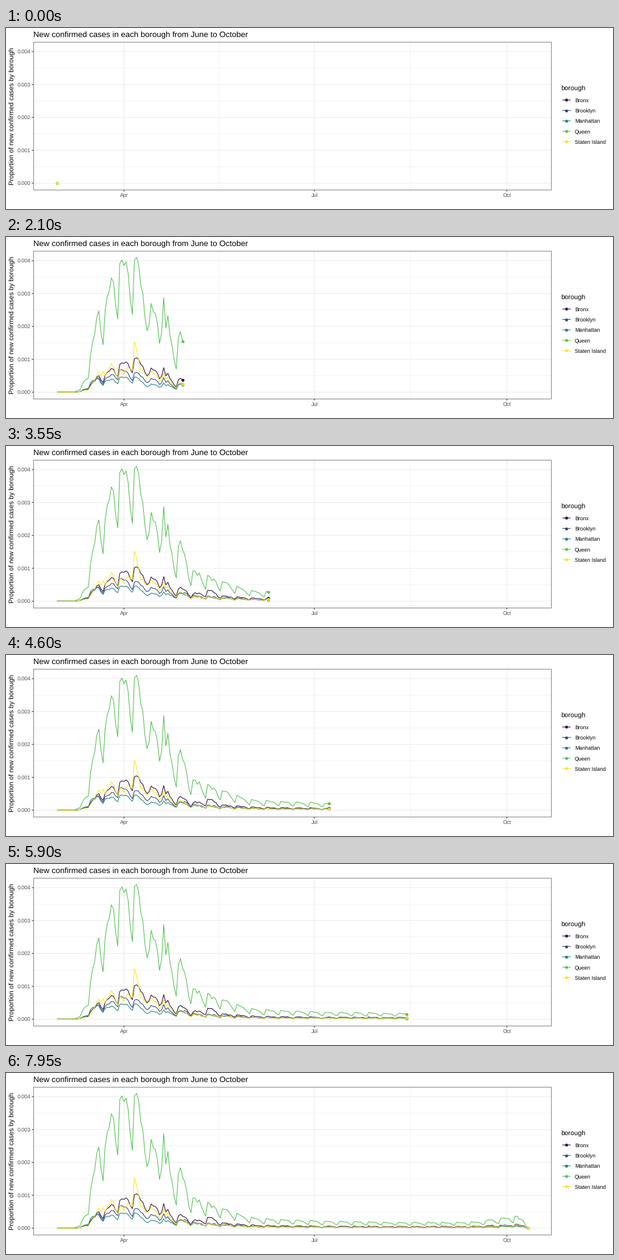
A matplotlib script that plays this animation: 1000 by 300 pixels, repeating every 8 s.

```python
import numpy as np
import matplotlib.pyplot as plt
from matplotlib.animation import FuncAnimation

plt.rcParams["font.family"] = "Liberation Sans"
plt.rcParams["text.hinting"] = "none"

W, H, DPI = 1000, 300, 100
FRAMES, INTERVAL = 160, 50
LAST_DAY = 225                      # 29 Feb to 11 Oct
LEFT, RIGHT, TOP, BOTTOM = 45.3, 898.3, 23.4, 268.3
X0, DAY = LEFT + (RIGHT - LEFT) / 22, (RIGHT - LEFT) / 1.1 / LAST_DAY
Y0, UNIT = 257.2, 0.545             # pixels per 0.00001
GRID, DARK, GREY = "#EBEBEB", "#333333", "#4D4D4D"

rng = np.random.default_rng(7)
days = np.arange(LAST_DAY + 1)


def px(pts):
    return pts * 72 / DPI


def day_x(d):
    return X0 + DAY * d


def curve(*knots):
    return np.interp(days, *zip(*knots))


def jitter(amount):
    """Random scatter once the first wave is over."""
    return 1 + amount * rng.uniform(-1, 1, len(days)) * (days > 60)


# one epidemic level, modulated by the weekly reporting rhythm
week = np.array([.7, .55, 1.15, 1.15, 1.07, 1.07, .95])[days % 7]
level = curve((8, 0), (11, 7), (13, 36), (16, 98), (18, 165), (20, 260),
              (22, 262), (23, 216), (26, 325), (29, 405), (30, 340),
              (34, 380), (36, 430), (37, 350), (39, 363), (40, 304),
              (43, 340), (44, 180), (45, 235), (49, 212), (50, 330),
              (52, 170), (53, 218), (54, 160), (57, 128), (59, 160),
              (64, 86), (72, 65), (80, 52), (87, 37), (94, 27), (101, 24),
              (130, 18), (167, 15), (200, 16), (212, 26), (219, 31),
              (223, 22), (225, 0))
wave = level * week * jitter(.07)

# each borough follows the wave at its own slowly changing share
GROUPS = [
    ("Bronx", "#31063F",
     wave * jitter(.15) * curve((16, .2), (29, .21), (36, .25), (48, .28),
                                (57, .22), (70, .28), (74, .5), (77, .28),
                                (225, .32))),
    ("Brooklyn", "#2F437B",
     wave * jitter(.15) * curve((16, .2), (25, .15), (30, .175), (37, .145),
                                (48, .16), (59, .135), (62, .19), (225, .24))),
    ("Manhattan", "#1F7F7D",
     wave * jitter(.15) * curve((16, .26), (20, .16), (25, .115), (37, .115),
                                (43, .09), (53, .1), (62, .16), (225, .18))),
    ("Queen", "#52BF52", wave),
    ("Staten Island", "#F9E622",
     wave * jitter(.15) * curve((16, .16), (21, .27), (22, .44), (23, .2),
                                (26, .25), (32, .14), (36, .28), (37, .38),
                                (40, .2), (43, .25), (59, .16), (225, .26))),
]
CURVES = [Y0 - UNIT * values for _, _, values in GROUPS]

fig = plt.figure(figsize=(W / DPI, H / DPI), dpi=DPI, facecolor="white")
ax = fig.add_axes([0, 0, 1, 1])
ax.set(xlim=(0, W), ylim=(H, 0))
ax.axis("off")


def rule(xs, ys, color, width=1.07, z=1):
    return ax.plot(xs, ys, color=color, lw=px(width), zorder=z, snap=False,
                   solid_capstyle="butt", solid_joinstyle="round")[0]


def dot(x, y, color, z):
    return ax.plot([x], [y], "o", color=color, ms=px(4.8), mew=0, zorder=z,
                   snap=False)[0]


def label(x, y, s, size=8.8, color="black", **kw):
    ax.text(x, y, s, fontsize=px(size), color=color, va="baseline", **kw)


# grid, ticks and axis labels
for y in Y0 - UNIT * np.arange(50, 400, 100):
    rule([LEFT, RIGHT], [y, y], GRID, .54)
for x in day_x(np.array([77.5, 169])):
    rule([x, x], [TOP, BOTTOM], GRID, .54)
for i in range(5):
    y = Y0 - UNIT * 100 * i
    rule([LEFT, RIGHT], [y, y], GRID)
    rule([LEFT - 2.75, LEFT], [y, y], DARK)
    label(40.4, y + 3.2, f"{i / 1000:.3f}", color=GREY, ha="right")
for day, month in [(32, "Apr"), (123, "Jul"), (215, "Oct")]:
    x = day_x(day)
    rule([x, x], [TOP, BOTTOM], GRID)
    rule([x, x], [BOTTOM, BOTTOM + 2.75], DARK)
    label(x, 280, month, color=GREY, ha="center")
border = rule([LEFT, RIGHT, RIGHT, LEFT, LEFT],
              [TOP, TOP, BOTTOM, BOTTOM, TOP], DARK, .6, 9)
border.set_snap(True)

label(45.2, 15.2, "New confirmed cases in each borough from June to October", 13.2)
label(13.4, 146.2, "Proportion of new confirmed cases by borough", 11,
      rotation=90, rotation_mode="anchor", ha="center")
label(914.4, 104.2, "borough", 11)

lines, dots = [], []
for i, (name, color, _) in enumerate(GROUPS):
    y = 119.3 + 17.28 * i
    rule([916.5, 930.3], [y, y], color)
    dot(923.4, y, color, 2)
    label(937, y + 3.2, name)
    lines.append(rule([], [], color, z=3 + i / 10))
    dots.append(dot(X0, Y0, color, 5 + i / 10))


def draw(frame):
    last = min(LAST_DAY, int((frame + .5) * LAST_DAY / (FRAMES - 1)))
    xs = day_x(days[:last + 1])
    for line, point, ys in zip(lines, dots, CURVES):
        line.set_data(xs, ys[:last + 1])
        point.set_data(xs[-1:], ys[last:last + 1])
    return lines + dots


anim = FuncAnimation(fig, draw, frames=FRAMES, interval=INTERVAL,
                     repeat=True, repeat_delay=0)
plt.show()
```
